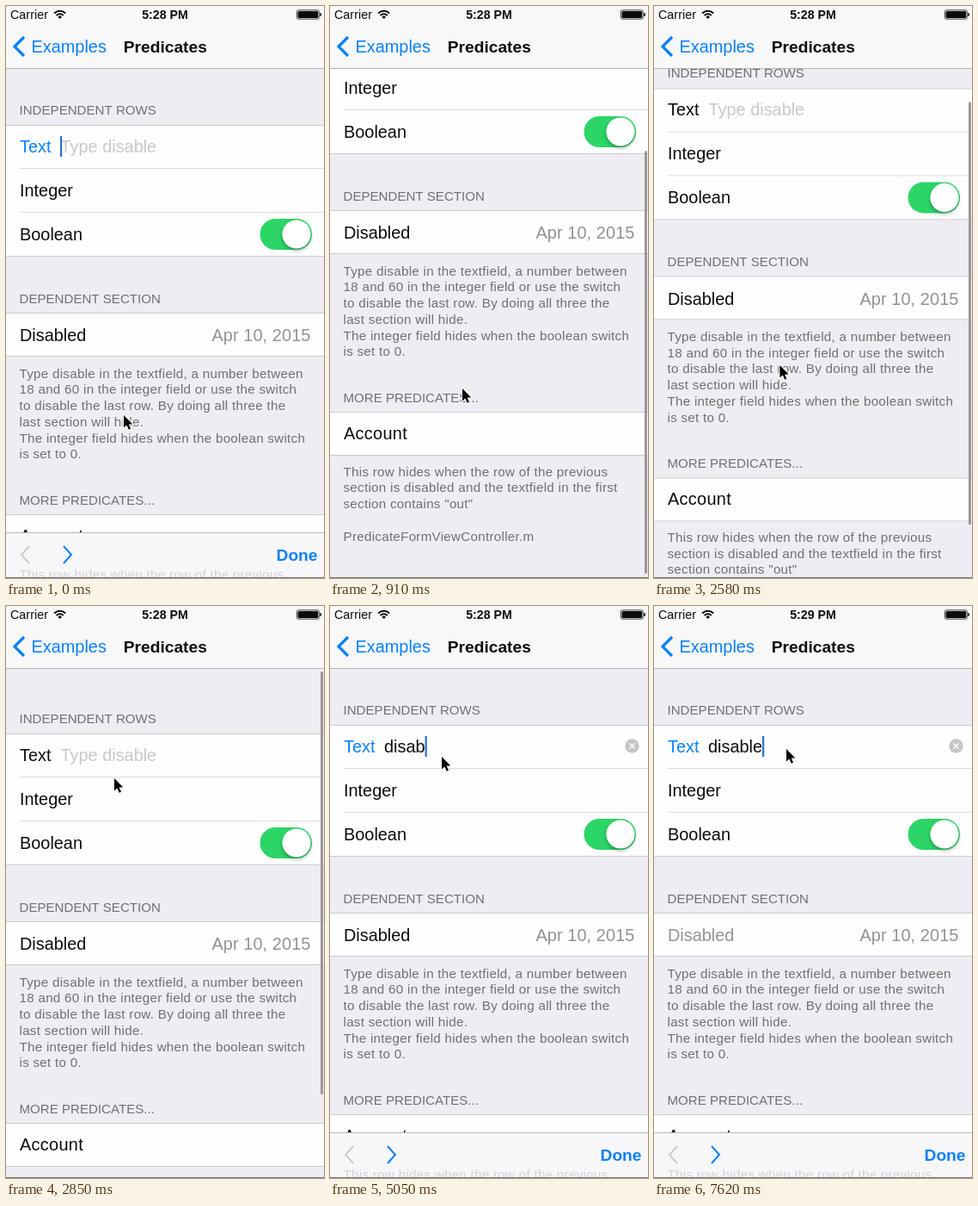
Write an HTML page with a canvas that moves like this. It is 370 by 664 pixels and loops after 8000 ms.

```html
<!DOCTYPE html>
<html lang="en">
<head>
<meta charset="utf-8">
<title>Predicates form</title>
<style>
html, body { margin: 0; width: 100%; height: 100%; overflow: hidden; background: #f8f8f8; }
canvas { display: block; width: 370px; height: 664px; }
</style>
</head>
<body>
<canvas id="stage"></canvas>
<script>
const W = 370, H = 664, LOOP = 8000;
const NAV_H = 73, BAR_TOP = 612, MAX_SCROLL = 111;
const BLUE = '#0a80fa', BLACK = '#0c0c0c', GRAY = '#929297', LABEL = '#6f6f75';
const GROUP = '#eeedf3', LINE = '#cbcad0', CHROME = '#f8f8f8';
const SANS = '"Liberation Sans", Arial, sans-serif';
const BODY = '19.9px ' + SANS, SMALL = '15.1px ' + SANS, NOTE = '15.2px ' + SANS;
const BOLD = 'bold 19.2px ' + SANS, STATUS = '14.2px ' + SANS;

const canvas = document.getElementById('stage');
const ctx = canvas.getContext('2d');
const dpr = window.devicePixelRatio || 1;
canvas.width = W * dpr;
canvas.height = H * dpr;

// keyframes: [time, value, ...]
const scrollKeys = [[340, 0], [600, 72], [840, 119], [940, 119], [1300, 111],
  [2450, 111], [2620, 32], [2800, -10], [2870, -10], [3230, 0]];
const pointerKeys = [[60, 137, 475], [310, 150, 542], [600, 152, 440], [850, 154, 444],
  [1150, 154, 444], [1600, 163, 584], [1660, 163, 584], [1710, 181, 456], [1980, 92, 390],
  [2230, 136, 333], [2450, 136, 333], [2620, 148, 430], [2840, 126, 200], [2900, 126, 200],
  [3300, 130, 175], [6000, 130, 175], [6350, 22, 385], [6570, 58, 416], [6810, 96, 398],
  [7100, 110, 330], [7560, 154, 166]];
const toolbarKeys = [[350, 0], [600, 54], [3430, 54], [3680, 0]];
const indicatorKeys = [[340, 0], [420, 1], [1250, 1], [1500, 0],
  [2460, 0], [2540, 1], [3230, 1], [3480, 0]];
const caretKeys = [[6050, 1], [6150, 0], [6400, 0], [6500, 1], [6950, 1], [7050, 0], [7350, 0], [7450, 1]];
const typedAt = [4210, 4390, 4510, 4750, 5050, 5290, 5470];

const notes = [
  'Type disable in the textfield, a number between',
  '18 and 60 in the integer field or use the switch',
  'to disable the last row. By doing all three the',
  'last section will hide.',
  'The integer field hides when the boolean switch',
  'is set to 0.'
];
const moreNotes = [
  'This row hides when the row of the previous',
  'section is disabled and the textfield in the first',
  'section contains "out"',
  '',
  'PredicateFormViewController.m'
];

function tween(keys, t) {
  if (t <= keys[0][0]) return keys[0].slice(1);
  for (let i = 1; i < keys.length; i++) {
    const a = keys[i - 1], b = keys[i];
    if (t < b[0]) {
      const k = (t - a[0]) / (b[0] - a[0]), e = k * k * (3 - 2 * k);
      return a.slice(1).map((v, j) => v + (b[j + 1] - v) * e);
    }
  }
  return keys[keys.length - 1].slice(1);
}

function box(x, y, w, h, color) {
  ctx.fillStyle = color;
  ctx.fillRect(x, y, w, h);
}

function pill(x, y, w, h, r, color) {
  ctx.fillStyle = color;
  ctx.beginPath();
  ctx.roundRect(x, y, w, h, r);
  ctx.fill();
}

function disc(x, y, r, color) {
  ctx.fillStyle = color;
  ctx.beginPath();
  ctx.arc(x, y, r, 0, Math.PI * 2);
  ctx.fill();
}

function text(str, x, y, font, color, align = 'left', spacing = 0) {
  ctx.font = font;
  ctx.fillStyle = color;
  ctx.textAlign = align;
  ctx.letterSpacing = spacing + 'px';
  ctx.fillText(str, x, y);
}

function polyline(points, color, width) {
  ctx.strokeStyle = color;
  ctx.lineWidth = width;
  ctx.beginPath();
  points.forEach(([x, y]) => ctx.lineTo(x, y));
  ctx.stroke();
}

function chevron(x, y, dx, dy, color, width) {
  polyline([[x + dx, y - dy], [x, y], [x + dx, y + dy]], color, width);
}

function section(y, rows) {
  box(0, y, W, rows * 51, '#fefefe');
  box(0, y, W, 1, LINE);
  for (let i = 1; i < rows; i++) box(16, y + i * 51 - 1, W - 16, 1, '#dcdce0');
  box(0, y + rows * 51 - 1, W, 1, LINE);
}

function paragraph(lines, y) {
  lines.forEach((s, i) => text(s, 15.5, y + i * 18.75, NOTE, LABEL, 'left', 0.27));
}

function toggle(x, y) {
  pill(x, y, 60.5, 36, 18, '#2bd566');
  ctx.save();
  ctx.shadowColor = 'rgba(0,0,0,.3)';
  ctx.shadowBlur = 4 * dpr;
  ctx.shadowOffsetY = 2.5 * dpr;
  disc(x + 42.5, y + 18, 16.6, '#fff');
  ctx.restore();
}

function clearButton(x, y) {
  disc(x, y, 8.2, '#c5c5ca');
  polyline([[x - 3, y - 3], [x + 3, y + 3]], '#fff', 1.5);
  polyline([[x - 3, y + 3], [x + 3, y - 3]], '#fff', 1.5);
}

function textField(t, editing) {
  const typed = 'disable'.slice(0, typedAt.filter(at => t >= at).length);
  text('Text', 16, 170, BODY, editing ? BLUE : BLACK);
  if (typed) {
    text(typed, 63, 170, BODY, BLACK);
    clearButton(351.5, 162.5);
  } else {
    text('Type disable', 63.5, 170, BODY, '#c9c9ce');
  }
  if (!editing) return;
  ctx.font = BODY;
  const x = 63 + (typed ? ctx.measureText(typed).width : 0);
  ctx.globalAlpha = tween(caretKeys, t)[0];
  box(x, 151, 2.2, 24, '#2b70d8');
  ctx.globalAlpha = 1;
}

function form(t) {
  const editing = t < 360 || t >= 3430;
  text('INDEPENDENT ROWS', 15.5, 126, SMALL, LABEL);
  section(138, 3);
  textField(t, editing);
  text('Integer', 16, 221, BODY, BLACK);
  text('Boolean', 16, 272, BODY, BLACK);
  toggle(295.5, 247);

  text('DEPENDENT SECTION', 15.5, 345, SMALL, LABEL);
  section(356, 1);
  text('Disabled', 16, 389.3, BODY, t >= typedAt[6] ? GRAY : BLACK);
  text('Apr 10, 2015', 354.5, 389.3, BODY, GRAY, 'right', 0.1);
  paragraph(notes, 431.5);

  text('MORE PREDICATES...', 15.5, 578.5, SMALL, LABEL);
  section(590, 1);
  text('Account', 16, 622, BODY, BLACK, 'left', 0.3);
  paragraph(moreNotes, 664.5);
}

function indicator(t, scroll) {
  const p = Math.min(1, Math.max(0, scroll / MAX_SCROLL));
  ctx.globalAlpha = tween(indicatorKeys, t)[0];
  pill(366, 76 + p * 92, 3, 491, 1.5, '#98989c');
  ctx.globalAlpha = 1;
}

function toolbar(t, scroll) {
  const shift = tween(toolbarKeys, t)[0];
  if (shift >= 53) return;
  const top = BAR_TOP + shift;
  ctx.save();
  ctx.beginPath();
  ctx.rect(0, top - 1, W, H - top + 1);
  ctx.clip();
  box(0, top - 1, W, H, '#f7f7f9');
  box(0, top - 1, W, 1, '#b9b9bc');
  text(moreNotes[0], 15.5, 664.5 - scroll, NOTE, '#d3d3d7', 'left', 0.27);
  chevron(18, top + 25, 9, 10, '#c3c3c8', 1.8);
  chevron(76, top + 25, -9, 10, BLUE, 2);
  text('Done', 362.5, top + 32, BOLD, BLUE, 'right');
  ctx.restore();
}

function wifi(x, y) {
  const from = -Math.PI * 0.75, to = -Math.PI * 0.25;
  ctx.fillStyle = ctx.strokeStyle = BLACK;
  ctx.lineWidth = 2;
  ctx.beginPath();
  ctx.moveTo(x, y);
  ctx.arc(x, y, 3.2, from, to);
  ctx.fill();
  for (const r of [5.7, 9.2]) {
    ctx.beginPath();
    ctx.arc(x, y, r, from, to);
    ctx.stroke();
  }
}

function battery() {
  ctx.strokeStyle = BLACK;
  ctx.lineWidth = 0.8;
  ctx.beginPath();
  ctx.roundRect(338.5, 4.8, 25.8, 10.4, 1.8);
  ctx.stroke();
  pill(339.6, 5.9, 23.6, 8.2, 1, BLACK);
  pill(365.3, 8, 1.6, 4, 1, BLACK);
}

function header(t) {
  box(0, 0, W, NAV_H, CHROME);
  box(0, NAV_H - 1, W, 1, '#b6b6b9');
  text('Carrier', 5, 15, STATUS, BLACK, 'left', 0.1);
  wifi(62.7, 15);
  text(t < 5110 ? '5:28 PM' : '5:29 PM', 185, 15, 'bold ' + STATUS, BLACK, 'center');
  battery();
  chevron(10, 47, 11, 11, BLUE, 3.2);
  text('Examples', 29.5, 54, BODY, BLUE);
  text('Predicates', 185.3, 54, BOLD, BLACK, 'center');
}

function pointer(x, y) {
  ctx.beginPath();
  [[0, 0], [0, 14.5], [3.4, 11.4], [5.8, 16.8], [8, 15.8], [5.7, 10.6], [10.3, 10.4]]
    .forEach(([dx, dy]) => ctx.lineTo(x + dx, y + dy));
  ctx.closePath();
  ctx.strokeStyle = '#fff';
  ctx.lineWidth = 2;
  ctx.stroke();
  ctx.fillStyle = '#000';
  ctx.fill();
}

function draw(t) {
  const scroll = tween(scrollKeys, t)[0];
  ctx.setTransform(dpr, 0, 0, dpr, 0, 0);
  box(0, 0, W, H, GROUP);
  ctx.save();
  ctx.translate(0, -scroll);
  form(t);
  ctx.restore();
  indicator(t, scroll);
  toolbar(t, scroll);
  header(t);
  box(0, H - 1, W, 1, '#77777a');
  pointer(...tween(pointerKeys, t));
}

const start = performance.now();
function loop() {
  draw((performance.now() - start) % LOOP);
  requestAnimationFrame(loop);
}
loop();
</script>
</body>
</html>
```
